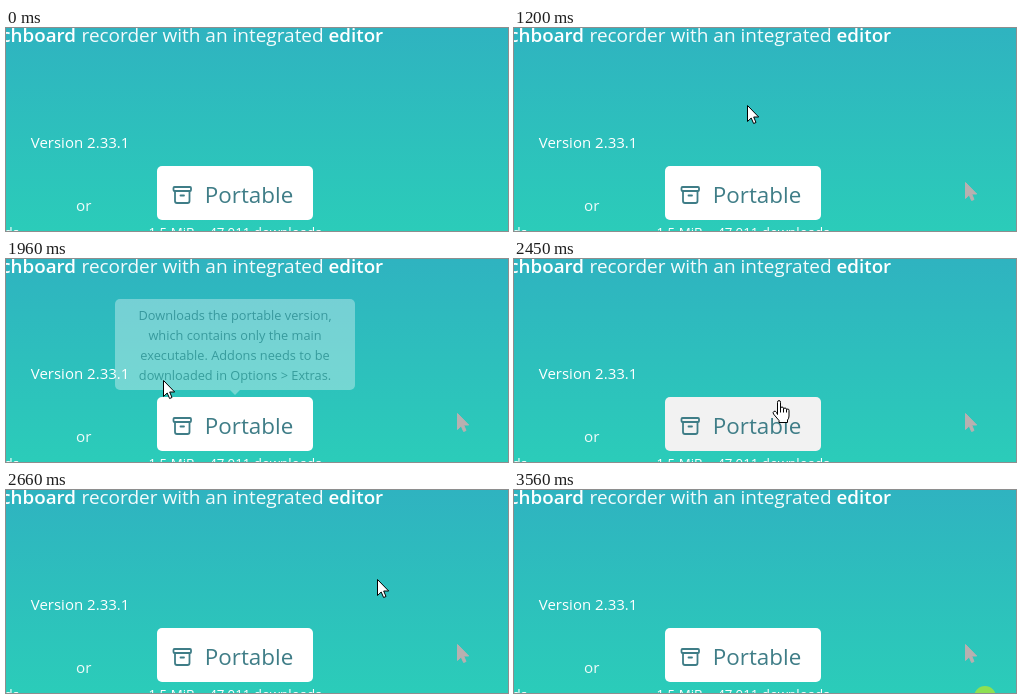
An HTML page that plays this animation: 502x203 px, repeating every 3.63 s.

```html
<!DOCTYPE html>
<html lang="en">
<head>
<meta charset="utf-8">
<title>Portable download</title>
<style>
  html, body { margin: 0; width: 100%; height: 100%; overflow: hidden; }
  svg { display: block; font-family: "Open Sans", "Noto Sans", sans-serif; fill: #fff; }
  .title { font-size: 19px; }
  .bold { font-size: 18.8px; font-weight: 600; }
  .small { font-size: 13.3px; }
  #tip { font-size: 12.75px; text-anchor: middle; }
  #tip text { fill: #4a5a60; }
  .icon { fill: none; stroke: #3f7d87; stroke-width: 1.8; stroke-linejoin: round; stroke-linecap: round; }
  #arrow, #hand { stroke: #000; stroke-linejoin: round; }
</style>
</head>
<body>
<svg width="502" height="203" viewBox="0 0 502 203">
  <defs>
    <linearGradient id="sky" x2="0" y2="1">
      <stop stop-color="#2fb3c0"/>
      <stop offset="1" stop-color="#2bccb9"/>
    </linearGradient>
    <path id="pointer" d="M.5 .5V16.5L4.2 13L6.6 18.5L9 17.5L6.7 12H11.7Z"/>
  </defs>
  <rect width="502" height="203" fill="url(#sky)"/>

  <g class="title">
    <text class="bold" x="70" y="14" text-anchor="end">sketchboard</text>
    <text x="75.5" y="14" fill-opacity=".95">recorder with an integrated</text>
    <text class="bold" x="322.5" y="14">editor</text>
  </g>
  <text x="24.8" y="120" font-size="15">Version 2.33.1</text>
  <text x="70" y="183" font-size="15.2" fill-opacity=".92">or</text>
  <g class="small">
    <text x="13" y="209" text-anchor="end">downloads</text>
    <text x="229" y="209" text-anchor="middle">1.5 MiB ~ 47,011 downloads</text>
  </g>

  <rect id="button" x="151" y="138" width="156" height="54" rx="5"/>
  <g class="icon">
    <rect x="167.5" y="159" width="17.5" height="4" rx="1"/>
    <path d="M169 163V173Q169 175 171 175H181.5Q183.5 175 183.5 173V163M174.5 167.5H178"/>
  </g>
  <text x="198.8" y="175" font-size="22.4" fill="#3f7d87">Portable</text>

  <g id="tip">
    <rect x="109" y="40" width="240" height="91" rx="5"/>
    <path d="M224 131H234L229 136Z"/>
    <text x="229" y="60.5">Downloads the portable version,</text>
    <text x="229" y="80.7">which contains only the main</text>
    <text x="229" y="101">executable. Addons needs to be</text>
    <text x="229" y="121.3">downloaded in Options &gt; Extras.</text>
  </g>

  <use id="trace" href="#pointer" x="451" y="154" fill="#b8b0b0" stroke="#b8b0b0"/>
  <circle id="click" cx="471" cy="207" r="11" fill="#8ee052"/>
  <use id="arrow" href="#pointer"/>
  <path id="hand" d="M5 14.5V2.5Q5 .5 6.5 .5T8 2.5V8.5Q8 7 9.5 7T11 8.5V9.5Q11 8 12.5 8T14 9.5V10.5Q14 9 15.3 9T16.5 10.5V16Q16.5 18.5 15 20V22.5H6.5V20.5L1 14Q0 12 1.5 11.3T4 12.5ZM8 8V12.5M11 9V12.5M14 10V12.5"/>
</svg>
<script>
const LOOP = 3630, STEP = 70, ENTER = 660, LEAVE = 3360;
const $ = id => document.getElementById(id);
const show = (id, on) => $(id).style.display = on ? "" : "none";

// Turning points of the pointer: time, x, y
const turns = [
  [630, 490, 180], [840, 400, 123], [1120, 238, 67], [1330, 275, 113],
  [1470, 387, 85], [1610, 305, 43], [1960, 157, 121], [2170, 96, 147],
  [2450, 264, 141], [2660, 371, 89], [2800, 417, 130], [LEAVE, 461, 210]
];

// Smooth curve through the turning points
function pointerAt(t) {
  let i = 0;
  while (i < turns.length - 2 && turns[i + 1][0] <= t) i++;
  const a = turns[i], b = turns[i + 1];
  const before = turns[i - 1] || a, after = turns[i + 2] || b;
  const span = b[0] - a[0], u = (t - a[0]) / span;
  return [1, 2].map(k => {
    const m = (b[k] - before[k]) / (b[0] - before[0]) * span;
    const n = (after[k] - a[k]) / (after[0] - a[0]) * span;
    const d = b[k] - a[k];
    return Math.round(a[k] + u * (m + u * (3 * d - 2 * m - n + u * (m + n - 2 * d))));
  });
}

function draw(t) {
  const s = Math.floor(t / STEP) * STEP; // the screen refreshes in steps
  const moving = t >= ENTER && t < LEAVE;
  const [x, y] = moving ? pointerAt(s) : [0, 0];
  const hover = x > 151 && x < 307 && y > 138 && y < 192;

  show("arrow", moving && !hover);
  show("hand", hover);
  $("arrow").setAttribute("transform", `translate(${x} ${y})`);
  $("hand").setAttribute("transform", `translate(${x - 5.5} ${y})`);
  $("button").style.fill = hover ? "#f2f2f2" : "#fff";
  $("tip").style.opacity = Math.max(0, 0.68 * (1 - Math.abs(s - 2100) / 280));
  show("trace", t >= 724);
  show("click", t >= 3560);
}

const begin = performance.now();
function tick() {
  draw((performance.now() - begin) % LOOP);
  requestAnimationFrame(tick);
}
tick();
</script>
</body>
</html>
```
